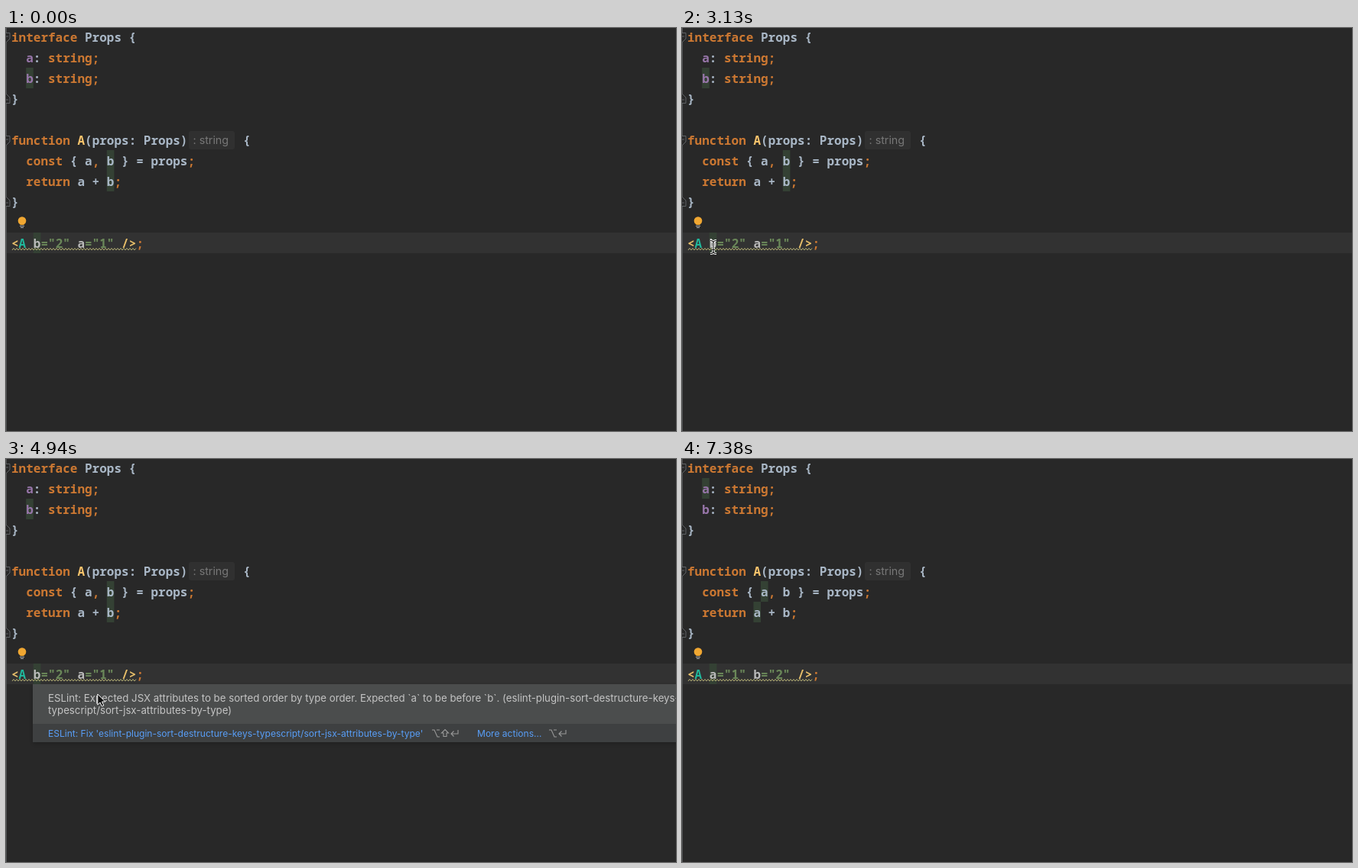
These frames come from a looping animation (876x528 px, 7450 ms). An HTML page:

```html
<!DOCTYPE html>
<html lang="en">
<head>
<meta charset="utf-8">
<title>Sort JSX attributes</title>
<style>
  html, body { margin: 0; width: 100%; height: 100%; overflow: hidden; background: #282828; }
  svg { display: block; width: 876px; height: 528px; }
  text { white-space: pre; }
  .code { font: 600 16px "Noto Sans Mono", "DejaVu Sans Mono", monospace; fill: #a9b7c6; }
  .ui { font: 13.24px Inter, "Liberation Sans", sans-serif; fill: #c4c4c4; }
  .k { fill: #cc7832; }
  .p { fill: #9876aa; }
  .f { fill: #ffc66d; }
  .t { fill: #e8bf6a; }
  .c { fill: #20b89c; }
  .n { fill: #bababa; }
  .s { fill: #6a8759; }
  .ui .link { font-size: 12.06px; fill: #589df6; }
  .ui .hint { font-size: 14.3px; fill: #787878; }
  .line { fill: none; stroke: #999; stroke-width: 1.1; }
  .mark { fill: #344134; }
  .fold { fill: #282828; stroke: #606366; }
  .halo { fill: none; stroke: #fff; stroke-width: 3; }
  .core { fill: none; stroke: #111; stroke-width: 1.1; }
</style>
</head>
<body>
<svg viewBox="0 0 876 528">
  <defs>
    <path id="beam" d="M-4-8.5Q0-8.5 0-5.5Q0-8.5 4-8.5M0-6V6M-4 8.5Q0 8.5 0 5.5Q0 8.5 4 8.5M-2 3.5H2"/>
    <path id="down" d="M-4 .5H5V8L.5 12.5L-4 8ZM-1 5H3"/>
    <path id="up" d="M-4 12.5H5V5L.5 .5L-4 5ZM-1 8H3"/>
    <path id="option" d="M0 1H3L7 10H10M6 1H10"/>
    <path id="shift" d="M5 .5L9.5 5H7V9.5H3V5H.5Z"/>
    <path id="enter" d="M10 1V6H1M4.5 2.5L1 6L4.5 9.5"/>
    <filter id="shadow" x="-5%" y="-20%" width="110%" height="150%">
      <feDropShadow dx="0" dy="2" stdDeviation="3" flood-opacity=".22"/>
    </filter>
  </defs>

  <rect width="876" height="528" fill="#282828"/>
  <rect y="268" width="876" height="27" fill="#323232"/>
  <path d="M.5 0V528" stroke="#505354"/>
  <use href="#down" class="fold" y="6"/>
  <use href="#up" class="fold" y="86"/>
  <use href="#down" class="fold" y="141"/>
  <use href="#up" class="fold" y="221"/>
  <g id="marks"></g>

  <g class="code">
    <text x="7" y="18"><tspan class="k">interface</tspan> Props {</text>
    <text x="7" y="45">  <tspan class="p">a</tspan>: <tspan class="k">string;</tspan></text>
    <text x="7" y="72">  <tspan class="p">b</tspan>: <tspan class="k">string;</tspan></text>
    <text x="7" y="99">}</text>
    <text x="7" y="153"><tspan class="k">function</tspan> <tspan class="f">A</tspan>(props: Props)</text>
    <text x="310" y="153">{</text>
    <text x="7" y="180">  <tspan class="k">const</tspan> { a<tspan class="k">,</tspan> b } = props<tspan class="k">;</tspan></text>
    <text x="7" y="207">  <tspan class="k">return</tspan> a + b<tspan class="k">;</tspan></text>
    <text x="7" y="234">}</text>
    <text x="7" y="288" id="jsx"></text>
  </g>
  <rect x="239" y="135" width="60" height="24" rx="3" fill="#303030"/>
  <g class="ui"><text x="244.5" y="152" class="hint">: string</text></g>
  <path id="wave" class="line" style="stroke:#b5b075;stroke-width:1"/>

  <g id="bulb">
    <circle cx="21" cy="252.5" r="5.3" fill="#f0a732"/>
    <path d="M18.5 256H23.5V258H18.5Z" fill="#f0a732"/>
    <path d="M18 259.5H24M19 261.5H23" stroke="#afb1b3"/>
  </g>
  <rect id="caret" x="35" y="271" width="2" height="22" fill="#d0d0d0"/>

  <g id="popup">
    <g filter="url(#shadow)">
      <rect x="35" y="295" width="860" height="76" fill="#4b4d4d"/>
    </g>
    <rect x="35" y="347" width="860" height="24" fill="#3e4041"/>
    <g class="ui">
      <text x="55" y="318">ESLint: Expected JSX attributes to be sorted order by type order. Expected `a` to be before `b`. (eslint-plugin-sort-destructure-keys-</text>
      <text x="55" y="334">typescript/sort-jsx-attributes-by-type)</text>
      <text x="55" y="364" class="link">ESLint: Fix 'eslint-plugin-sort-destructure-keys-typescript/sort-jsx-attributes-by-type'</text>
      <text x="616" y="364" class="link">More actions…</text>
    </g>
    <path id="underline" d="M55 365.5H546" stroke="#589df6"/>
    <g class="line">
      <use href="#option" x="557" y="354"/>
      <use href="#shift" x="569" y="354"/>
      <use href="#enter" x="581" y="354"/>
      <use href="#option" x="710" y="354"/>
      <use href="#enter" x="722" y="354"/>
    </g>
  </g>

  <g id="mouse">
    <g id="ibeam"><use href="#beam" class="halo"/><use href="#beam" class="core"/></g>
    <path id="arrow" d="M0 0V14L3.3 11L5.5 16L8 15L5.8 10H10Z" fill="#111" stroke="#fff"/>
    <g id="hand">
      <path d="M-3 1.5Q-1.5-.5 0 1.5L1 5.5Q2.5 4.5 3.5 6Q5 5.3 6 7Q8 6.5 8 9V12L6.5 16H-1L-5.5 10.5Q-6 8.5-4 8.8L-2 10Z" fill="#fff" stroke="#111"/>
      <path d="M1 10V13.5M3 10V13.5M5 10V13.5" stroke="#111" stroke-width=".8"/>
    </g>
  </g>
</svg>
<script>
const LOOP = 7450, POPUP = 4130, FIX = 5800;
const el = id => document.getElementById(id);
const show = (id, on) => el(id).style.display = on ? '' : 'none';
const ease = p => p * p * (3 - 2 * p);
const easeOut = p => 1 - (1 - p) ** 3;

// Mouse moves: start, end, from, to, easing
const moves = [
  [60, 1060, [337, 457], [50, 311], easeOut],
  [1180, 1540, [50, 311], [41, 288], ease],
  [2310, 3060, [41, 288], [41, 287], ease],
  [3200, 3810, [41, 287], [41, 280], ease],
  [4630, 5380, [41, 280], [252, 355], ease],
  [6630, 7040, [252, 355], [434, 545], p => p * p]
];

function mouseAt(t) {
  const [start, end, from, to, curve] = moves.findLast(m => t >= m[0]) || moves[0];
  const p = curve(Math.min(1, Math.max(0, (t - start) / (end - start))));
  return from.map((v, i) => v + (to[i] - v) * p);
}

function caretOn(t) {
  if (t >= FIX) return t < 6440 || (t >= 6940 && t < 7380);
  if (t >= 1880 && t < 2380) return true;
  return t % 1000 >= 380 && t % 1000 < 880;
}

const attr = (name, value) =>
  `<tspan class="n">${name}</tspan><tspan class="s">="${value}"</tspan> `;

// Marked cells as [line, column]
const cells = {
  a: [[1, 2], [6, 10], [7, 9], [10, 3]],
  b: [[2, 2], [6, 13], [7, 13], [10, 3]]
};

let current;
function setOrder(sorted) {
  if (sorted === current) return;
  current = sorted;
  const attrs = [attr('a', 1), attr('b', 2)];
  if (!sorted) attrs.reverse();
  el('jsx').innerHTML = '<tspan class="t">&lt;</tspan><tspan class="c">A</tspan> ' +
    attrs.join('') + '<tspan class="t">/&gt;</tspan><tspan class="k">;</tspan>';
  el('marks').innerHTML = cells[sorted ? 'a' : 'b'].map(([line, col]) =>
    `<rect class="mark" x="${7 + col * 9.6}" y="${line * 27 - 2}" width="9.6" height="27"/>`).join('');
}

function draw(t) {
  const [x, y] = mouseAt(t);
  const open = t >= POPUP && t < FIX;
  const onPopup = open && x > 35 && y > 295;
  const onLink = onPopup && y > 347 && x > 55 && x < 546;
  setOrder(t >= FIX);
  show('bulb', t < FIX || t >= 6700);
  show('caret', caretOn(t));
  show('popup', open);
  show('underline', onLink);
  show('mouse', t >= 60 && t < 7040);
  show('ibeam', !onPopup);
  show('arrow', onPopup && !onLink);
  show('hand', onLink);
  el('mouse').setAttribute('transform', `translate(${x} ${y})`);
}

el('wave').setAttribute('d', 'M8 291' + 'l2-2.5l2 2.5'.repeat(40) + 'l2-2.5');

function tick(now) {
  draw(now % LOOP);
  requestAnimationFrame(tick);
}
draw(0);
requestAnimationFrame(tick);
</script>
</body>
</html>
```
